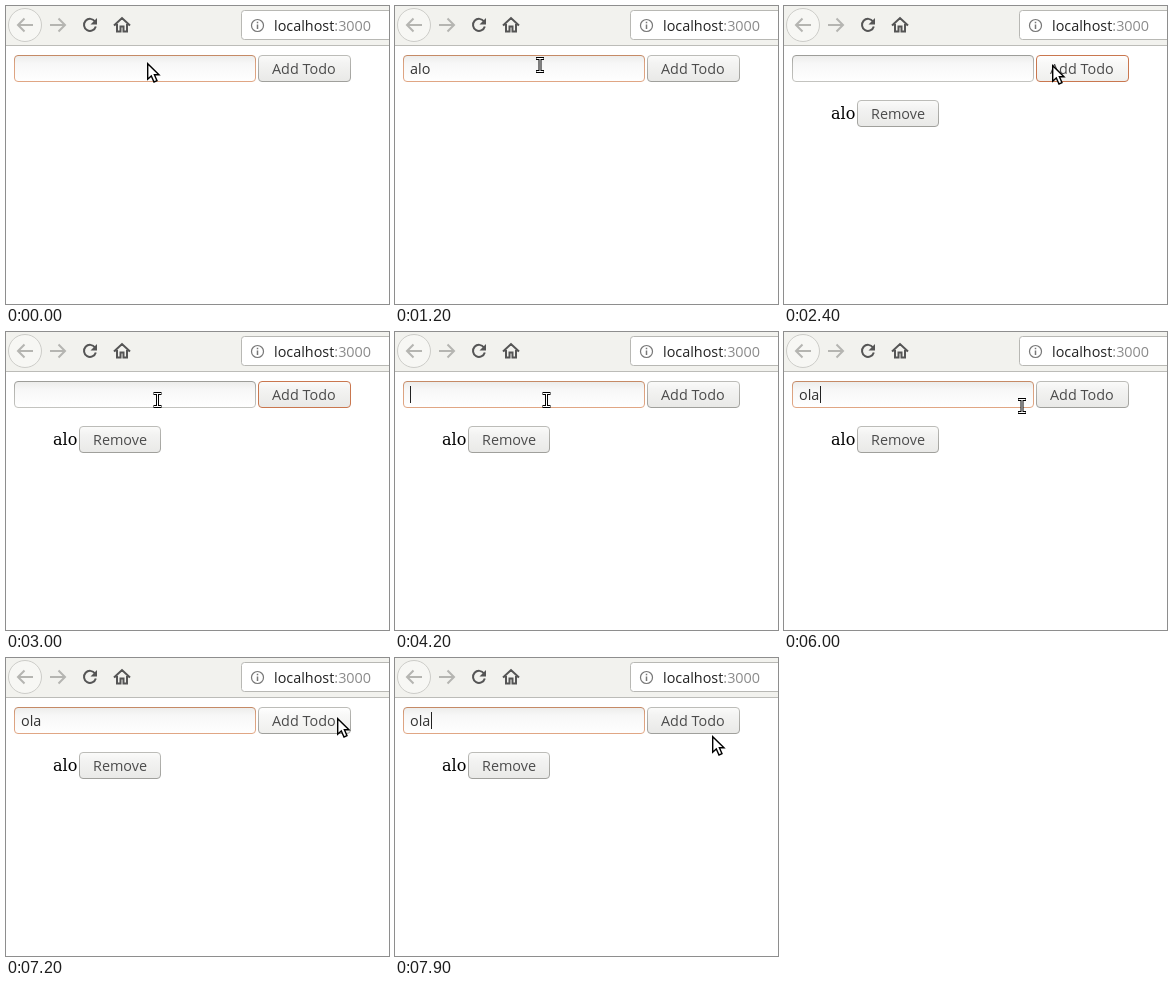
Animation, 383 px wide and 298 px high, one loop 8 s. Source, as an HTML page:

```html
<!DOCTYPE html>
<html lang="en">
<head>
<meta charset="utf-8">
<title>Todo list</title>
<style>
  html, body { margin: 0; width: 100%; height: 100%; overflow: hidden; background: #fff; }
  svg { display: block; }
  text { font: 14.4px "Open Sans", "Noto Sans", sans-serif; fill: #4c4c4c; white-space: pre; }
  .serif { font: 16px "DejaVu Serif", serif; fill: #000; }
  .icon { fill: none; stroke: #555; stroke-width: 2; }
  .pale { stroke: #b5b5b1; }
  #field { fill: url(#inset); stroke: url(#grey); }
  #field.focus { stroke: url(#orange); }
  .button { fill: url(#raised); stroke: url(#rim); }
  .button.hover { fill: url(#lit); }
  .button.pressed { fill: url(#sunk); }
  .button.focus { stroke: #c9774f; }
  .hidden { visibility: hidden; }
</style>
</head>
<body>
<svg width="383" height="298" viewBox="0 0 383 298">
  <defs id="defs"></defs>

  <!-- toolbar -->
  <rect width="383" height="39" fill="#f2f2ee"/>
  <rect y="39" width="383" height="1" fill="#bcbcb8"/>
  <circle cx="19" cy="19" r="16.5" fill="#f7f7f4" stroke="#cdcdc9"/>
  <path class="icon pale" d="M27 19H12M18.500 12.500L12 19L18.500 25.500"/>
  <path class="icon pale" d="M44 19H59M52.500 12.500L59 19L52.500 25.500"/>
  <path class="icon" d="M89 15.500A6 6 0 1 0 89.800 20.500"/>
  <path d="M91 12V18.500H84.500Z" fill="#555"/>
  <path class="icon" d="M108 19.500L116 12L124 19.500M111 18V25.500H114.500V20.500H117.500V25.500H121V18"/>
  <rect x="235.500" y="4.500" width="160" height="29" rx="3" fill="#fff" stroke="#b8b8b4"/>
  <circle cx="251.500" cy="19.500" r="6" fill="none" stroke="#777" stroke-width="1.200"/>
  <path d="M251.500 18.500V23M251.500 15.700V17.200" stroke="#777" stroke-width="1.500"/>
  <text x="268" y="25" style="fill:#222">localhost<tspan fill="#8b8b8b">:3000</tspan></text>

  <!-- form -->
  <rect id="field" x="8.500" y="49.500" width="241" height="26" rx="3.500"/>
  <text id="typed" x="15" y="68" style="fill:#333"></text>
  <rect id="caret" y="54" width="1" height="17" fill="#222"/>
  <rect id="add" class="button" x="252.500" y="49.500" width="92" height="26" rx="3.500"/>
  <text x="266" y="68">Add Todo</text>

  <!-- list -->
  <g id="item">
    <text class="serif" x="47" y="113">alo</text>
    <rect class="button" x="73.500" y="94.500" width="81" height="26" rx="3.500"/>
    <text x="87" y="113">Remove</text>
  </g>

  <path id="arrow" d="M.7 .7V16.200L4.300 12.900L7 19L10 17.700L7.400 11.700H12Z" fill="#fff" stroke="#000" stroke-width="1.400"/>
  <g id="beam" fill="none">
    <path d="M-4 -6.500H4M-4 6.500H4M0 -7V7" stroke="#000" stroke-width="3"/>
    <path d="M-3.500 -6.500H3.500M-3.500 6.500H3.500M0 -6.500V6.500" stroke="#fff" stroke-width="1"/>
  </g>
</svg>
<script>
const $ = id => document.getElementById(id);
const LOOP = 8000;

// vertical gradients: top, middle, bottom
const gradients = {
  inset: ["#ececeb", "#f7f7f7", "#ffffff"],
  raised: ["#fbfbfa", "#f3f3f2", "#e9e9e7"],
  lit: ["#ffffff", "#f8f8f7", "#efefed"],
  sunk: ["#d6d6d3", "#dededb", "#e4e4e1"],
  grey: ["#9d9d99", "#b4b4b0", "#c3c3bf"],
  rim: ["#bcbcb8", "#b2b2ae", "#a0a09c"],
  orange: ["#c58a66", "#dba280", "#e0a684"]
};
$("defs").innerHTML = Object.entries(gradients).map(([id, colors]) =>
  `<linearGradient id="${id}" x2="0" y2="1">` +
  colors.map((c, i) => `<stop offset="${[0, 0.3, 1][i]}" stop-color="${c}"/>`).join("") +
  "</linearGradient>").join("");

// pointer moves: start time, then one point per 100 ms
const moves = [
  [0, [141, 57]],
  [200, [145, 59]],
  [1700, [172, 63], [215, 67], [262, 66], [268, 59]],
  [2700, [258, 61], [225, 73], [180, 71], [151.5, 68]],
  [6000, [238, 74], [262, 73], [290, 67], [318, 66], [340, 70], [349, 76], [345, 81], [337, 83]],
  [7100, [337, 72], [331, 60], [321, 86], [316, 82]],
  [7800, [316, 80], [317, 78]]
];

const changes = [
  [0, { text: "", caret: false, focus: "field", pressed: false, item: false }],
  [700, { text: "al", caret: true }],
  [900, { text: "alo" }],
  [1200, { caret: false }],
  [2200, { focus: "add", pressed: true }],
  [2400, { text: "", pressed: false, item: true }],
  [4200, { focus: "field", caret: true }],
  [5300, { text: "o" }],
  [5400, { text: "ol" }],
  [5500, { text: "ola" }],
  [6100, { caret: false }],
  [7800, { caret: true }]
];

function pointerAt(t) {
  const [start, ...points] = moves.findLast(m => m[0] <= t);
  return points[Math.min(points.length - 1, Math.floor((t - start) / 100))];
}

const inside = (x, y, left, right) => x >= left && x < right && y >= 49 && y < 76;
const show = (id, on) => $(id).classList.toggle("hidden", !on);

function draw(t) {
  const state = Object.assign({}, ...changes.filter(c => c[0] <= t).map(c => c[1]));
  const [x, y] = pointerAt(t);
  const beam = t >= 200 && inside(x, y, 8, 250);

  const typed = $("typed");
  if (typed.textContent !== state.text) typed.textContent = state.text;
  const width = state.text ? typed.getComputedTextLength() + 1 : 0;
  $("caret").setAttribute("x", 15 + Math.floor(width));
  show("caret", state.caret);
  show("item", state.item);

  $("field").classList.toggle("focus", state.focus === "field");
  const add = $("add").classList;
  add.toggle("focus", state.focus === "add");
  add.toggle("pressed", state.pressed);
  add.toggle("hover", inside(x, y, 252, 345));

  show("arrow", !beam);
  show("beam", beam);
  $(beam ? "beam" : "arrow").setAttribute("transform", `translate(${x} ${y})`);
}

const begin = performance.now();
function tick() {
  draw((performance.now() - begin) % LOOP);
  requestAnimationFrame(tick);
}
tick();
</script>
</body>
</html>
```
